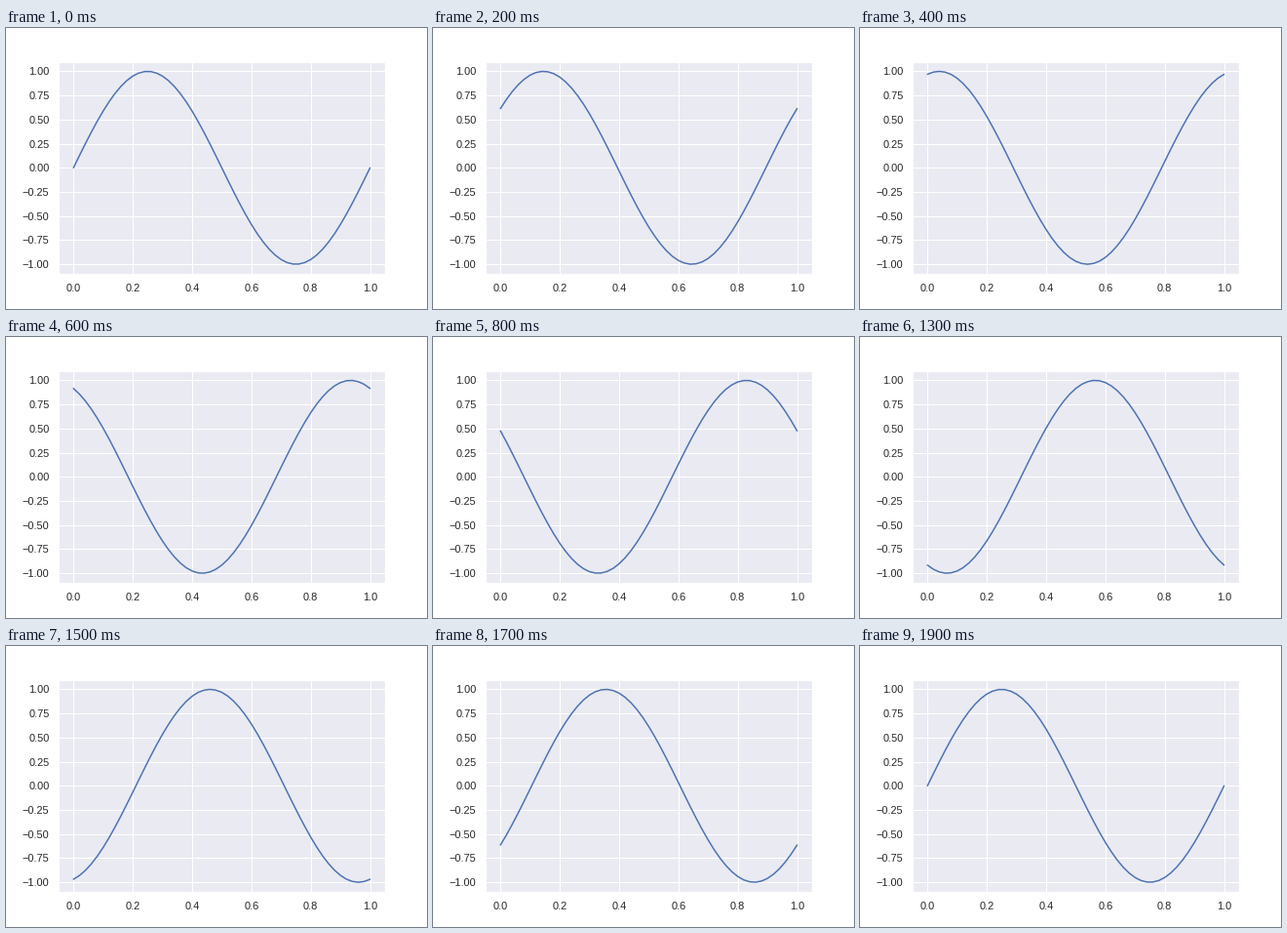
Animation of 432x288 px, one loop 2 s. Source, as a matplotlib script:

```python
import numpy as np
import matplotlib.pyplot as plt
from matplotlib.animation import FuncAnimation

FRAMES = 20
INTERVAL = 100

plt.rcParams.update({
    "font.family": "Liberation Sans",
    "text.color": ".15",
    "axes.facecolor": "#EAEAF2",
    "axes.edgecolor": "white",
    "axes.linewidth": 1.25,
    "axes.grid": True,
    "axes.axisbelow": True,
    "grid.color": "white",
    "grid.linewidth": 1,
    "lines.linewidth": 1.5,
    "lines.solid_capstyle": "round",
    "xtick.color": ".15",
    "ytick.color": ".15",
    "xtick.labelsize": 11,
    "ytick.labelsize": 11,
    "xtick.major.size": 6,
    "ytick.major.size": 6,
    "xtick.bottom": False,
    "ytick.left": False,
})

fig, ax = plt.subplots(figsize=(6, 4), dpi=72, facecolor="white")
fig.subplots_adjust(left=0.125, right=0.9, bottom=0.125, top=0.88)

x = np.linspace(0, 1, 51)
phases = np.linspace(0, 2 * np.pi, FRAMES)
line, = ax.plot(x, np.sin(2 * np.pi * x), color="#4C72B0")

ax.set_xticks(np.linspace(0, 1, 6))
ax.set_yticks(np.linspace(-1, 1, 9))
ax.set_xlim(-0.05, 1.05)
ax.set_ylim(-1.1, 1.1)


def update(i):
    line.set_ydata(np.sin(2 * np.pi * x + phases[i]))
    return line,


anim = FuncAnimation(fig, update, frames=FRAMES, interval=INTERVAL,
                     init_func=lambda: update(0), repeat=True, repeat_delay=0)
plt.show()
```
